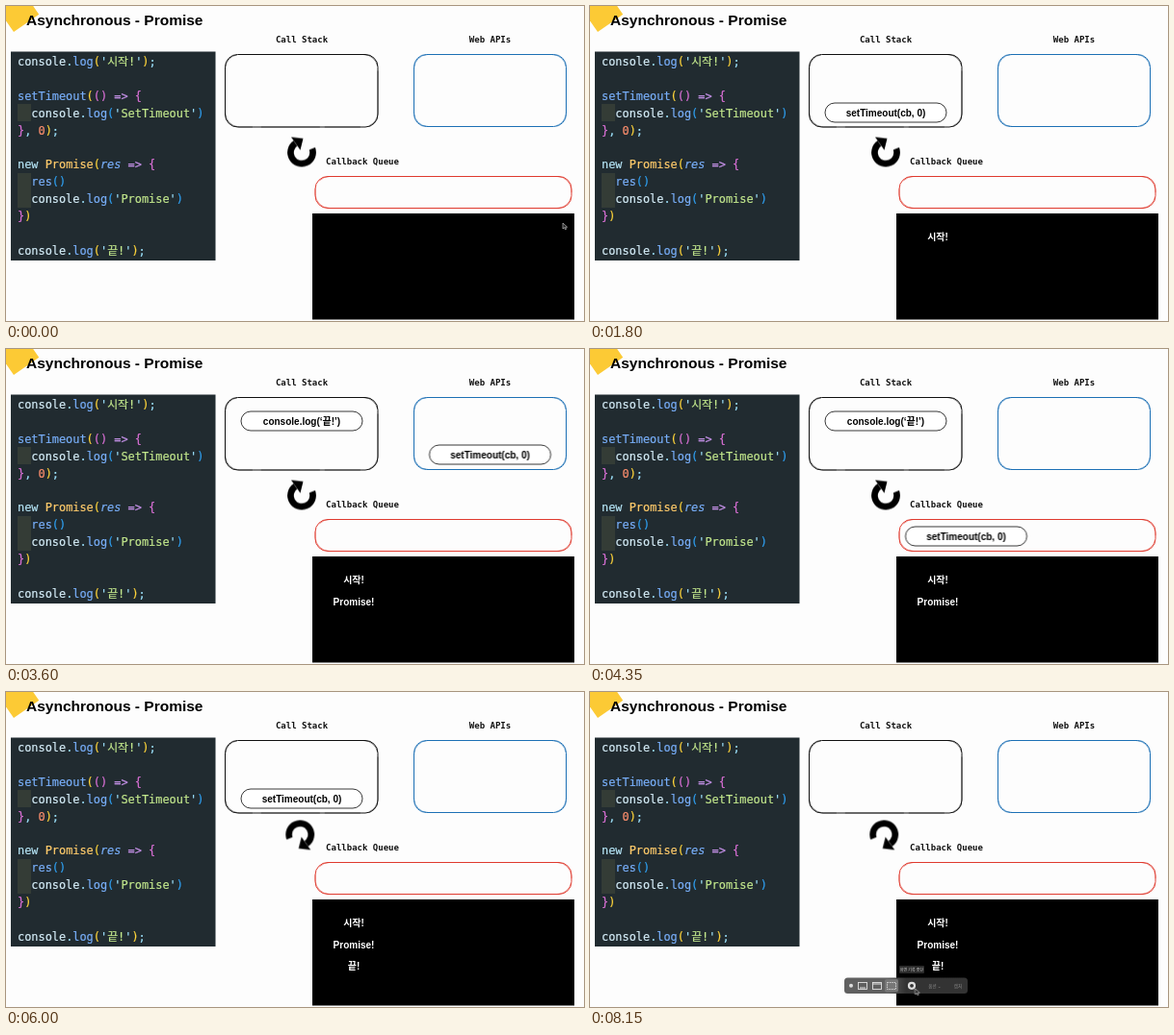
Animation, 600 px wide and 328 px high, one loop 8.2 s. Source, as an HTML page:

```html
<!DOCTYPE html>
<html lang="ko">
<head>
<meta charset="utf-8">
<title>Asynchronous - Promise</title>
<style>
  html, body { margin: 0; width: 100%; height: 100%; overflow: hidden; background: #fdfdfd; }
  svg { display: block; width: 600px; height: 328px; }
  text { font-family: "Liberation Sans", "Noto Sans CJK KR", "Noto Sans CJK", sans-serif; }
  .title { font-size: 15.5px; font-weight: 700; }
  .code text {
    font: 11.9px "DejaVu Sans Mono", "Noto Sans CJK KR", "Noto Sans CJK", monospace;
    white-space: pre;
  }
  .code tspan { stroke: currentColor; stroke-width: .2px; fill: currentColor; }
  .head { font: 700 9px "DejaVu Sans Mono", monospace; text-anchor: middle; fill: #111; }
  .pill rect { fill: #fff; stroke: #222; stroke-width: .9; }
  .pill text, .out { font-size: 10px; font-weight: 700; text-anchor: middle; }
  .out { fill: #fff; }
  .bar text { font-size: 4.5px; fill: #8b8b8b; text-anchor: middle; }
  .bar .tip { font-size: 4px; fill: #ccc; }
</style>
</head>
<body>
<svg viewBox="0 0 600 328">
  <defs>
    <linearGradient id="glass">
      <stop offset=".35" stop-color="#606060"/>
      <stop offset=".5" stop-color="#333"/>
    </linearGradient>
  </defs>
  <rect x="-10" y="-17" width="32" height="32" fill="#fcca35" transform="translate(0 16) rotate(-35) translate(7 -4)" id="logo"/>
  <text class="title" x="21" y="20">Asynchronous - Promise</text>

  <rect x="5" y="47.5" width="212.5" height="217.5" fill="#212b30"/>
  <path d="M12 102h14v18h-14zM12 174h14v36h-14z" fill="#343c36"/>
  <g class="code" id="code"></g>
  <g id="boxes"></g>
  <rect x="318" y="216" width="272" height="110.5"/>

  <g id="loop">
    <path d="M10.9-4A11.6 11.6 0 1 1-6.6-9.5" fill="none" stroke="#000" stroke-width="6.6"/>
    <path d="M-11-16 1.5-14.5-1.5-2.5Z"/>
  </g>
  <g id="outs"></g>
  <g id="pills"></g>

  <g id="bar" class="bar">
    <rect x="264" y="297.5" width="128" height="16.5" rx="3.5" fill="url(#glass)"/>
    <rect x="306" y="299" width="14" height="13.5" rx="2" fill="#777"/>
    <circle cx="271" cy="305.8" r="2" fill="#ddd"/>
    <g id="icons" fill="none" stroke="#e2e2e2" stroke-width=".9"></g>
    <path d="M280 308h6M293.5 304h9" stroke="#e2e2e2"/>
    <circle cx="334" cy="305.8" r="3" fill="none" stroke="#ddd" stroke-width="2.2"/>
    <text x="358" y="307.5">옵션 ⌄</text>
    <text x="382" y="307.5">캡처</text>
  </g>
  <g id="tip" class="bar">
    <rect x="321" y="285" width="26" height="8" rx="1" fill="#2b2b2b"/>
    <text class="tip" x="334" y="290.7">화면 기록 중단</text>
  </g>
  <path id="cursor" d="M0 0v6l1.5-1.3 1 2.1 1.1-.5-1-2 2-.1Z" fill="#222" stroke="#ddd" stroke-width=".6"/>
</svg>
<script>
const LOOP = 8200, FADE = 150;
const $ = id => document.getElementById(id);

function add(parent, tag, attrs = {}, text = '') {
  const el = document.createElementNS('http://www.w3.org/2000/svg', tag);
  for (const k in attrs) el.setAttribute(k, attrs[k]);
  el.textContent = text;
  return parent.appendChild(el);
}

// Code listing with bracket colours by depth
const source = `console.log('시작!');

setTimeout(() => {
  console.log('SetTimeout')
}, 0);

new Promise(res => {
  res()
  console.log('Promise')
})

console.log('끝!');`;
const call = '#78aef8', cyan = '#9be0fa';
const colours = {
  console: '#d5edf8', log: call, setTimeout: call, res: call,
  new: '#b5e4f5', Promise: '#ffcb6b', '=>': '#c792ea', 0: '#f78c6c'
};
const brackets = ['#ffd43b', '#da70d6', '#2f9ff0'];
let depth = 0;

function colourOf(tok) {
  if (/[({]/.test(tok)) return brackets[depth++ % 3];
  if (/[)}]/.test(tok)) return brackets[--depth % 3];
  return colours[tok] || cyan;
}

source.split('\n').forEach((line, i) => {
  const row = add($('code'), 'text', { x: 12, y: 62 + i * 17.9 });
  const put = (s, color) => add(row, 'tspan', { color }, s);
  for (const tok of line.match(/'[^']*'|=>|\w+|\s+|./g) || []) {
    if (tok[0] === "'") {
      put("'", cyan);
      put(tok.slice(1, -1), '#c3e88d');
      put("'", cyan);
    } else {
      const span = put(tok, colourOf(tok));
      if (tok === 'res' && line.includes('=>')) span.setAttribute('font-style', 'italic');
    }
  }
});

// Box with a second, fainter pen stroke
function box(label, labelX, x, y, width, height, stroke) {
  const shape = { x, y, width, height, rx: 13, fill: 'none', stroke };
  add($('boxes'), 'rect', shape);
  add($('boxes'), 'rect', { ...shape, rx: 15, opacity: .5, 'stroke-dasharray': '37 5 61 9' });
  add($('boxes'), 'text', { class: 'head', x: labelX, y: y - 12.5 }, label);
}
box('Call Stack', 307, 227.5, 50.5, 158.5, 75.5, '#111');
box('Web APIs', 502.5, 423.5, 50.5, 158, 75, '#1d70b5');
box('Callback Queue', 370, 321, 177.5, 266, 33, '#e03a2e');

for (let i = 0; i < 3; i++) {
  add($('icons'), 'rect', {
    x: 278.5 + i * 15, y: 302.5, width: 9, height: 7,
    'stroke-dasharray': i === 2 ? '1.4 1' : 'none'
  });
}

// steps: [ms, [x, y], opacity, turn]; the first and last poses are held
function track(el, steps) {
  const first = [0, ...steps[0].slice(1)];
  const last = [LOOP, ...steps.at(-1).slice(1)];
  const frames = [first, ...steps, last].map(([ms, [x, y], opacity, turn = 0]) => ({
    offset: ms / LOOP, opacity, easing: 'ease-in-out',
    transform: `translate(${x}px, ${y}px) rotate(${turn}deg)`
  }));
  el.animate(frames, { duration: LOOP, iterations: Infinity });
}

const fadeIn = (ms, pos) => [[ms, pos, 0], [ms + FADE, pos, 1]];
const fadeOut = (ms, pos) => [[ms, pos, 1], [ms + FADE, pos, 0]];
const glide = (ms, from, to) => [[ms, from, 1], [ms + 450, to, 1]];

const stack = level => [307, 111 - level * 18];
const web = [502.5, 110], queue = [390.5, 195];

function pill(label, ...moves) {
  const g = add($('pills'), 'g', { class: 'pill' });
  add(g, 'rect', { x: -63, y: -10, width: 126, height: 20, rx: 10 });
  add(g, 'text', { y: 3.6 }, label);
  track(g, moves.flat());
}

const outputs = ['시작!', 'Promise!', '끝!', 'SetTimeout'];
const printed = i => 1000 + i * 1775;

outputs.forEach((label, i) => {
  const out = add($('outs'), 'text', { class: 'out' }, label);
  track(out, fadeIn(printed(i), [361, 244.3 + i * 22.2]));
});

pill('console.log(‘시작!’)', fadeIn(300, stack(0)), fadeOut(printed(0), stack(0)));
pill('setTimeout(cb, 0)',
  fadeIn(1350, stack(0)), glide(1950, stack(0), web), glide(3900, web, queue),
  glide(5400, queue, stack(0)), fadeOut(printed(3), stack(0)));
pill('Promise(cb)', fadeIn(2350, stack(1)), fadeOut(printed(1), stack(1)));
pill('console.log(‘끝!’)', fadeIn(3250, stack(2)), fadeOut(printed(2), stack(2)));

track($('loop'), [[5350, [307, 152.5], 1, 0], [5950, [305.3, 148.5], 1, 180]]);
track($('bar'), fadeIn(7500, [0, 0]));
track($('tip'), fadeIn(7950, [0, 0]));

const rest = [578, 226], enter = [430, 262], button = [337.5, 309];
track($('cursor'), [
  [50, rest, 1], [50, rest, 0], [7500, enter, 0], [7500, enter, 1], [8000, button, 1]
]);
$('logo').setAttribute('transform', 'translate(8 27) rotate(-35) translate(10 -15)');
</script>
</body>
</html>
```
